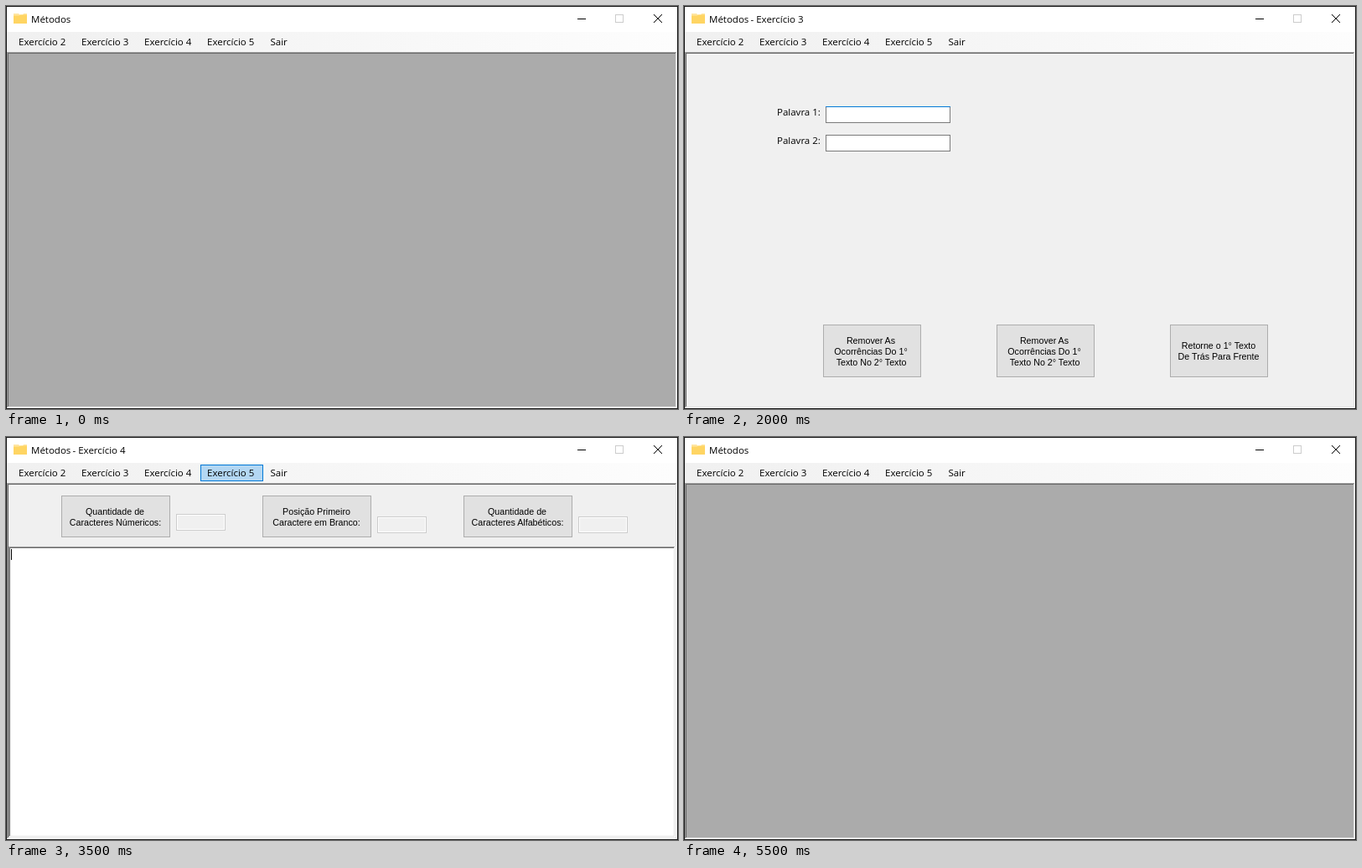
An HTML page for the animation above (6000 ms loop, 802x482 px).

```html
<!DOCTYPE html>
<html lang="pt">
<head>
<meta charset="utf-8">
<title>Métodos</title>
<style>
  html, body { margin: 0; width: 100%; height: 100%; overflow: hidden; background: #fff; }
  svg { display: block; width: 802px; height: 482px; }
  text { font: 11.5px "Open Sans", "Noto Sans", sans-serif; fill: #000; }
  .form text { font: 10.7px "Liberation Sans", Arial, sans-serif; }
  .form .title { font: 11.5px "Open Sans", "Noto Sans", sans-serif; }
  .mid text { text-anchor: middle; }
  rect, .line { shape-rendering: crispEdges; }
  .line { fill: none; }
  .face { fill: #f0f0f0; }
  .btn { fill: #e1e1e1; stroke: #adadad; }
  .box { fill: #fff; stroke: #7a7a7a; }
  .focus { fill: none; stroke: #0078d7; }
  .off { fill: #f0f0f0; stroke: #ccc; }
  .off + rect { fill: none; stroke: #fff; }
  .hot { fill: #b3d7f3; stroke: #0078d7; }
  .shade { stroke: #a0a0a0; }
  .dark { stroke: #696969; }
  .light { stroke: #e3e3e3; }
  .white { stroke: #fff; }

  /* --at counts half seconds from the start of the loop */
  .one, .two, .three {
    visibility: hidden;
    animation: one 6s step-end calc(var(--at) * .5s - 6s) infinite;
  }
  .two { animation-name: two; }
  .three { animation-name: three; }
  @keyframes one { 0% { visibility: visible } 8.333%, 100% { visibility: hidden } }
  @keyframes two { 0% { visibility: visible } 16.666%, 100% { visibility: hidden } }
  @keyframes three { 0% { visibility: visible } 25%, 100% { visibility: hidden } }
</style>
</head>
<body>
<svg viewBox="0 0 802 482" xmlns="http://www.w3.org/2000/svg">
  <defs>
    <linearGradient id="strip"><stop stop-color="#f0f0f0"/><stop offset="1" stop-color="#fdfdfd"/></linearGradient>
    <linearGradient id="margin"><stop stop-color="#fcfcfc"/><stop offset="1" stop-color="#f0f0f0"/></linearGradient>
    <rect id="big" class="btn" x=".5" y=".5" width="116" height="62"/>
    <rect id="wide" class="btn" x=".5" y=".5" width="129" height="49"/>
    <g id="small">
      <rect class="off" x=".5" y=".5" width="58" height="19"/>
      <rect x="1.5" y="1.5" width="56" height="17"/>
    </g>
    <g id="words">
      <rect class="box" x="169.5" y="120.5" width="148" height="19"/>
      <path class="line focus" d="M169 120.5h149"/>
      <rect class="box" x="169.5" y="154.5" width="148" height="19"/>
      <text x="111" y="131">Palavra 1:</text>
      <text x="111" y="165">Palavra 2:</text>
      <use href="#big" x="166" y="381"/>
      <use href="#big" x="373" y="381"/>
      <use href="#big" x="580" y="381"/>
    </g>
    <rect id="caret" width="1" height="13"/>
    <rect id="hover" class="hot" x=".5" y="33.5" width="74" height="19"/>
  </defs>

  <!-- window -->
  <rect width="802" height="482" fill="#fff"/>
  <rect x="1" y="31" width="800" height="24" fill="url(#strip)"/>
  <path d="M9 9h6l1.5 1.5H20L21 9h4v4H9z" fill="#ffe5a0"/>
  <path d="M9 11.5h6.5l1.5-1H25V21H9z" fill="#ffd563"/>
  <path class="line" d="M682 15.5h10" stroke="#000"/>
  <rect x="727.5" y="10.5" width="9" height="9" fill="none" stroke="#ccc"/>
  <path d="M773 10l10 10M783 10l-10 10" stroke="#000" fill="none"/>
  <rect x="3" y="57" width="796" height="422" fill="#ababab"/>
  <path class="line white" d="M1 480.5h799.500V55"/>
  <path class="line light" d="M2 479.5h797.500V56"/>
  <path class="line shade" d="M1.500 480V55.500H800"/>
  <path class="line dark" d="M2.500 479V56.500H799"/>

  <!-- menu -->
  <use class="one" style="--at:1" href="#hover" x="7"/>
  <use class="one" style="--at:3" href="#hover" x="82"/>
  <use class="one" style="--at:5" href="#hover" x="157"/>
  <use class="one" style="--at:7" href="#hover" x="232"/>
  <text x="30" y="20">Métodos</text>
  <text x="15" y="47">Exercício 2</text>
  <text x="90" y="47">Exercício 3</text>
  <text x="165" y="47">Exercício 4</text>
  <text x="240" y="47">Exercício 5</text>
  <text x="315.500" y="47">Sair</text>

  <g class="form two" style="--at:2">
    <rect class="face" x="3" y="57" width="796" height="422"/>
    <text class="title" x="79.500" y="20">- Exercício 2</text>
    <use href="#words"/>
    <use href="#caret" x="172" y="123"/>
    <g class="mid">
      <text x="223.500" y="417">Comparar Textos</text>
      <text x="431" y="410">Inserir 1° Texto No</text>
      <text x="430.500" y="423">Meio do 2° Texto</text>
      <text x="638.500" y="410">Inserir 2 Asteriscos</text>
      <text x="637.500" y="423">No Meio Do 1°Texto</text>
    </g>
  </g>

  <g class="form two" style="--at:4">
    <rect class="face" x="3" y="57" width="796" height="422"/>
    <text class="title" x="79.500" y="20">- Exercício 3</text>
    <use href="#words"/>
    <g class="mid">
      <text x="223" y="404">Remover As</text>
      <text x="223" y="417">Ocorrências Do 1°</text>
      <text x="223.500" y="430">Texto No 2° Texto</text>
      <text x="430" y="404">Remover As</text>
      <text x="430" y="417">Ocorrências Do 1°</text>
      <text x="430.500" y="430">Texto No 2° Texto</text>
      <text x="638" y="410">Retorne o 1° Texto</text>
      <text x="638" y="423">De Trás Para Frente</text>
    </g>
  </g>

  <g class="form two" style="--at:6">
    <rect class="face" x="3" y="57" width="796" height="422"/>
    <text class="title" x="79.500" y="20">- Exercício 4</text>
    <use href="#wide" x="66" y="70"/>
    <use href="#wide" x="306" y="70"/>
    <use href="#wide" x="546" y="70"/>
    <use href="#small" x="203" y="92"/>
    <use href="#small" x="443" y="95"/>
    <use href="#small" x="683" y="95"/>
    <g class="mid">
      <text x="130" y="93">Quantidade de</text>
      <text x="130.500" y="106">Caracteres Númericos:</text>
      <text x="370.500" y="93">Posição Primeiro</text>
      <text x="370.500" y="106">Caractere em Branco:</text>
      <text x="610" y="93">Quantidade de</text>
      <text x="610.500" y="106">Caracteres Alfabéticos:</text>
    </g>
    <rect x="5" y="133" width="792" height="344" fill="#fff"/>
    <path class="line white" d="M3 478.500h795.500V131"/>
    <path class="line light" d="M4 477.500h793.500V132"/>
    <path class="line shade" d="M3.500 478V131.500H798"/>
    <path class="line dark" d="M4.500 477V132.500H797"/>
    <use href="#caret" x="6" y="134"/>
  </g>

  <g class="form three" style="--at:8">
    <rect class="face" x="3" y="57" width="796" height="422"/>
    <text class="title" x="79.500" y="20">- Exercício 5</text>
    <rect class="box" x="169.500" y="120.500" width="114" height="19"/>
    <path class="line focus" d="M169 120.500h115"/>
    <rect class="box" x="169.500" y="154.500" width="114" height="19"/>
    <rect class="off" x="157.500" y="249.500" width="126" height="19"/>
    <rect x="158.500" y="250.500" width="124" height="17"/>
    <text x="110.500" y="131">Número 1:</text>
    <text x="110.500" y="165">Número 2:</text>
    <text x="110.500" y="263">Sorteio:</text>
    <use href="#big" x="166" y="381"/>
    <g class="mid"><text x="224" y="417">Sortear</text></g>
  </g>
  <use class="one" style="--at:8" href="#caret" x="172" y="123"/>

  <!-- context menu -->
  <g class="two" style="--at:9">
    <rect x="461.500" y="154.500" width="159" height="25" fill="#fdfdfd" stroke="#808080"/>
    <rect class="one" style="--at:9" x="462" y="156" width="25" height="22" fill="url(#margin)"/>
    <rect class="one hot" style="--at:10" x="463.500" y="156.500" width="155" height="21"/>
    <text x="496" y="171">Fechar Exercício</text>
  </g>

  <rect x=".5" y=".5" width="801" height="481" fill="none" stroke="#1a1a1a"/>
  <rect class="one" style="--at:10" x=".5" y=".5" width="801" height="481" fill="none" stroke="#404040"/>
</svg>
</body>
</html>
```
